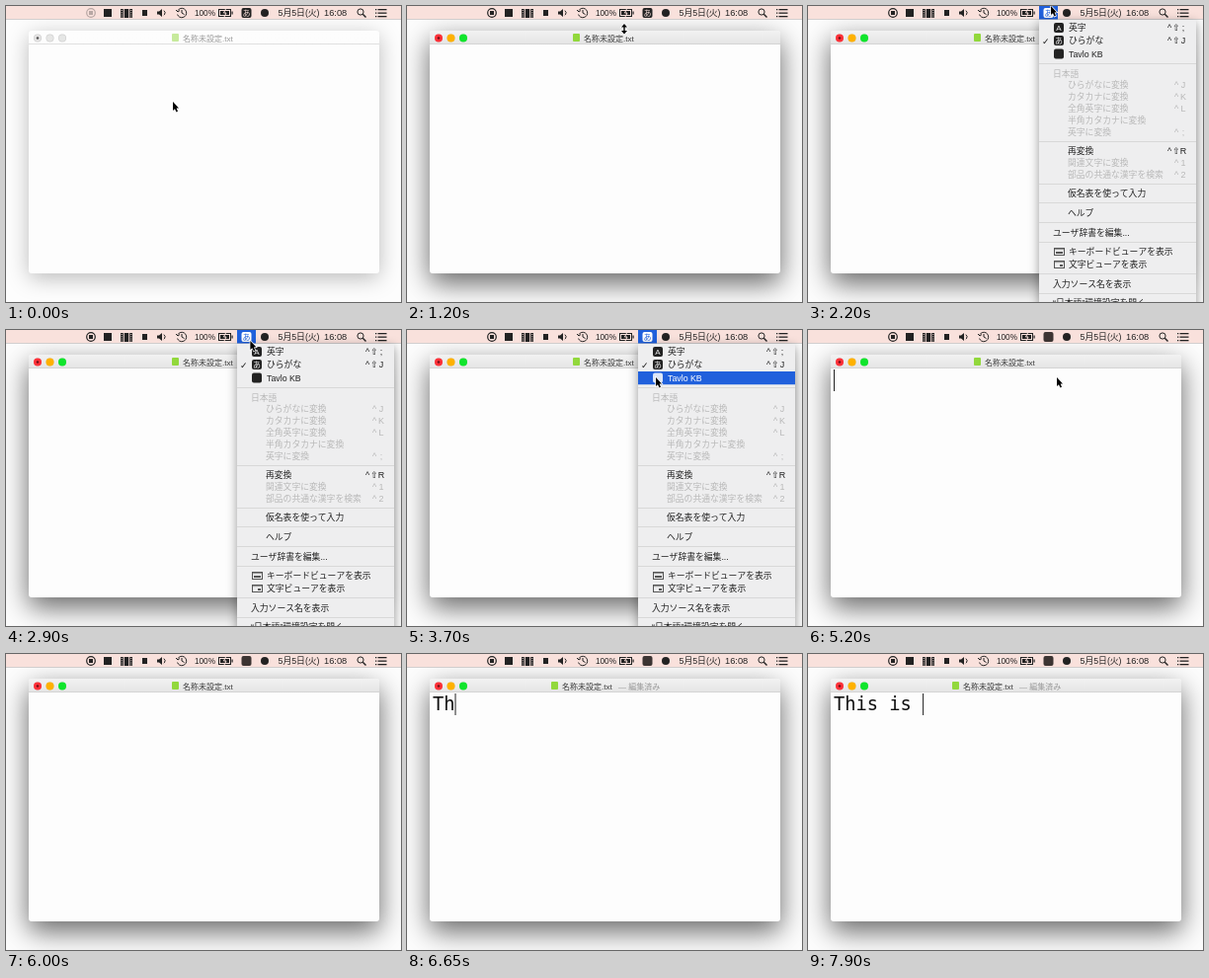
An HTML page with a canvas that plays this animation: 400x300 px, repeating every 8 s.

```html
<!DOCTYPE html>
<html lang="ja">
<head>
<meta charset="utf-8">
<style>
html, body { margin: 0; width: 400px; height: 300px; overflow: hidden; }
canvas { display: block; }
</style>
</head>
<body>
<canvas id="stage" width="400" height="300"></canvas>
<script>
const c = document.getElementById('stage').getContext('2d');
const LOOP = 8000, INK = '#222', BLUE = '#2060dc', BAR = '#f9e1dc', MENU = '#eeeeef';
const SANS = '"Liberation Sans", "Noto Sans CJK JP", "Noto Sans CJK", sans-serif';
const MONO = '"DejaVu Sans Mono", monospace';
const SIGNS = '"DejaVu Sans", sans-serif';

const ramp = (t, a, b) => Math.min(1, Math.max(0, (t - a) / (b - a)));
const ease = p => p * p * (3 - 2 * p);

function text(s, x, y, size = 9, color = INK, align = 'left', family = SANS) {
  c.font = `${size}px ${family}`;
  c.fillStyle = color;
  c.textAlign = align;
  c.fillText(s, x, y);
}
function rect(x, y, w, h, color, r = 0) {
  c.fillStyle = color;
  c.beginPath();
  c.roundRect(x, y, w, h, r);
  c.fill();
}
function disc(x, y, r, color) {
  c.fillStyle = color;
  c.beginPath();
  c.arc(x, y, r, 0, 7);
  c.fill();
}
function line(points, color = INK, width = 1) {
  c.strokeStyle = color;
  c.lineWidth = width;
  c.beginPath();
  points.forEach(p => c.lineTo(...p));
  c.stroke();
}
function ring(x, y, r, width = 1, from = 0, to = 7) {
  c.strokeStyle = INK;
  c.lineWidth = width;
  c.beginPath();
  c.arc(x, y, r, from, to);
  c.stroke();
}
function faded(alpha, draw) {
  if (alpha <= 0) return;
  c.save();
  c.globalAlpha = alpha;
  draw();
  c.restore();
}
function shadowed(alpha, blur, dy, draw) {
  c.save();
  c.shadowColor = `rgba(0,0,0,${alpha})`;
  c.shadowBlur = blur;
  c.shadowOffsetY = dy;
  draw();
  c.restore();
}
function tile(x, y, label, back, fore) {
  rect(x, y, 10, 10, back, 2);
  text(label, x + 5, y + 8, 8, fore, 'center');
}

function drawWindow(t, active) {
  const typed = 'This is '.slice(0, [6350, 6650, 6750, 6900, 7200, 7500, 7700, 7850].filter(k => t >= k).length);
  const edited = ramp(t, 6350, 6500);
  shadowed(.26 + .34 * active, 22 + 6 * active, 5 + 5 * active, () => rect(23, 25, 355, 246, '#fdfdfd', 3));
  faded(active, () => {
    const g = c.createLinearGradient(0, 25, 0, 39);
    g.addColorStop(0, '#f2f2f2');
    g.addColorStop(1, '#e4e4e4');
    rect(23, 25, 355, 14, g, [3, 3, 0, 0]);
  });
  rect(23, 38.5, 355, .6, '#c4c4c4');
  ['#ff3038', '#ffb100', '#10e52c'].forEach((color, i) => {
    const x = 32 + i * 12.5;
    disc(x, 32.5, 4, '#d0d0d0');
    disc(x, 32.5, 3.3, '#e6e6e6');
    faded(active, () => disc(x, 32.5, 4, color));
  });
  disc(32, 32.5, 1.3, active > .5 ? '#701018' : '#555');
  const title = x => {
    rect(x, 28, 7, 8, '#92d83c', 1);
    text('名称未設定.txt', x + 11, 35.5, 8, '#3c3c3c');
  };
  faded((.5 + .5 * active) * (1 - edited), () => title(168));
  faded(edited, () => {
    title(146);
    text('— 編集済み', 214, 35.5, 8, '#999');
  });
  text(typed, 26, 57, 18.7, '#111', 'left', MONO);
  const caret = t >= 6250 || t >= 4250 && t < 4600 || t >= 5200 && t < 5650;
  if (caret) rect(26 + typed.length * 11.26, 40, 1, 22, '#222');
}

function drawBar(t, active) {
  rect(0, 0, 400, 13, BAR);
  rect(0, 13, 400, .8, '#c4c0c0');
  faded(.3 + .7 * active, () => {
    ring(86, 7, 4.3, 1.2);
    rect(84, 5, 4, 4, INK);
  });
  rect(99, 3, 8, 8, INK);
  rect(116, 3, 12, 9, INK);
  [118.8, 124.2].forEach(x => rect(x, 3, 1, 9, BAR));
  for (let y = 4; y < 11; y += 2.2) {
    rect(116.7, y, 1, 1, BAR);
    rect(126.3, y, 1, 1, BAR);
  }
  rect(138, 4, 5, 6, INK);
  c.fillStyle = INK;
  c.beginPath();
  [[153, 5.5], [155, 5.5], [158, 3], [158, 11], [155, 8.5], [153, 8.5]].forEach(p => c.lineTo(...p));
  c.fill();
  ring(158, 7, 3, 1, -.9, .9);
  ring(178, 7, 4.7, 1, -2.6, 2.8);
  line([[178, 4], [178, 7], [180.5, 8.5]]);
  line([[172, 4], [174, 6], [176, 4.5]]);
  text('100%', 191, 10, 8.2);
  c.strokeStyle = INK;
  c.lineWidth = 1;
  c.strokeRect(215.5, 3.5, 12, 7);
  rect(217, 5, 9, 4, INK);
  rect(228.5, 5.5, 1.2, 3, INK);
  line([[222.5, 3], [220.5, 7], [223, 7], [221, 11]], BAR);
  const open = t >= 1850 && t < 4150;
  if (open) rect(234, 0, 19, 13.5, BLUE);
  if (t < 4150) tile(238.5, 2, 'あ', open ? '#fff' : INK, open ? BLUE : BAR);
  else rect(238.5, 2, 10, 10, '#3c3432', 2);
  disc(262, 7, 4, INK);
  text('5月5日(火)', 275.5, 10.3, 8.8);
  text('16:08', 322, 10.3, 9.3);
  ring(359, 6, 3.1);
  line([[361.3, 8.3], [364.5, 11.5]], INK, 1.4);
  [3, 6.5, 10].forEach(y => {
    rect(374, y, 1.3, 1.3, INK);
    rect(376.5, y, 9, 1.3, INK);
  });
}

// [label, x, middle y, shortcut, disabled]
const ITEMS = [
  ['英字', 264, 22, '^⇧;'], ['ひらがな', 264, 35, '^⇧J'], ['Tavlo KB', 264, 48.5],
  ['日本語', 248, 69, '', 1], ['ひらがなに変換', 263, 80, '^J', 1],
  ['カタカナに変換', 263, 92, '^K', 1], ['全角英字に変換', 263, 104, '^L', 1],
  ['半角カタカナに変換', 263, 116, '', 1], ['英字に変換', 263, 128, '^;', 1],
  ['再変換', 263, 147, '^⇧R'], ['関連文字に変換', 263, 159, '^1', 1],
  ['部品の共通な漢字を検索', 263, 171, '^2', 1], ['仮名表を使って入力', 263, 190],
  ['ヘルプ', 263, 209.5], ['ユーザ辞書を編集...', 248, 229.5],
  ['キーボードビューアを表示', 264, 249], ['文字ビューアを表示', 264, 262],
  ['入力ソース名を表示', 248, 282], ['“日本語”環境設定を開く...', 248, 301]
];
const RULES = [58.5, 137.5, 180.5, 199.5, 219.5, 239.5, 271.5, 291.5];

function drawMenu(hot) {
  shadowed(.4, 10, 3, () => rect(234, 14, 159, 300, MENU));
  RULES.forEach(y => rect(234, y - .5, 159, 1, '#d8d8d8'));
  if (hot >= 0) rect(234, [15.5, 28.5, 42][hot], 159, 13.3, BLUE);
  ITEMS.forEach(([label, x, y, keys, off], i) => {
    const color = i === hot ? '#fff' : off ? '#b8b8b8' : INK;
    text(label, x, y + 3.3, 8.8, color);
    if (!keys) return;
    [...keys].reverse().forEach((k, n) =>
      text(k, 380 - n * 7, y + 3.3, 9, color, 'center', k === '⇧' ? SIGNS : SANS));
  });
  const tint = i => i === hot ? ['#fff', BLUE] : [INK, MENU];
  tile(249, 17, 'A', ...tint(0));
  tile(249, 30, 'あ', ...tint(1));
  rect(249, 43.5, 10, 10, hot === 2 ? '#dce6f8' : INK, 2);
  text('✓', 237, 38.5, 9, hot === 1 ? '#fff' : INK, 'left', SIGNS);
  [245, 258].forEach((y, i) => {
    c.strokeStyle = '#555';
    c.lineWidth = 1;
    c.strokeRect(249.5, y + .5, 10, 7);
    rect(250, y + 1, 9, 1.2, '#999');
    rect(i ? 255 : 251, y + 4, i ? 3 : 7, 2, '#555');
  });
}

function pointer(t) {
  const path = [[850, 169, 97], [1200, 220, 23], [1500, 246, 0], [2700, 246, 0], [3350, 252, 48]];
  const i = path.findIndex(p => t < p[0]);
  if (i === 0) return path[0].slice(1);
  if (i < 0) return path[4].slice(1);
  const [a, b] = [path[i - 1], path[i]], raw = ramp(t, a[0], b[0]);
  const p = i === 1 ? raw : ease(raw);
  return [a[1] + (b[1] - a[1]) * p, a[2] + (b[2] - a[2]) * p];
}

function drawPointer(x, y, resizing) {
  const shape = resizing
    ? [[0, -5], [3, -1.5], [.7, -1.5], [.7, 2], [3, 2], [0, 5.5], [-3, 2], [-.7, 2], [-.7, -1.5], [-3, -1.5]]
    : [[0, 0], [0, 9], [2, 7.2], [3.5, 10.5], [5, 9.8], [3.6, 6.6], [6, 6.4]];
  c.save();
  c.translate(x, y);
  c.beginPath();
  shape.forEach(p => c.lineTo(...p));
  c.closePath();
  c.strokeStyle = '#fff';
  c.lineWidth = 1.4;
  c.stroke();
  c.fillStyle = '#000';
  c.fill();
  c.restore();
}

function draw(t) {
  const active = ramp(t, 0, 250);
  const [x, y] = pointer(t);
  rect(0, 0, 400, 300, '#fdfdfd');
  drawWindow(t, active);
  drawBar(t, active);
  if (t >= 2200) {
    const blink = t >= 3750 && t < 3800;
    const hot = y < 15.5 || blink ? -1 : y < 28.5 ? 0 : y < 42 ? 1 : 2;
    faded(1 - ramp(t, 3800, 3950), () => drawMenu(hot));
  }
  if (t < 5700) drawPointer(x, y, t > 850 && t < 1500 && y > 19 && y < 27);
}

function frame(now) {
  draw(now % LOOP);
  requestAnimationFrame(frame);
}
requestAnimationFrame(frame);
</script>
</body>
</html>
```
